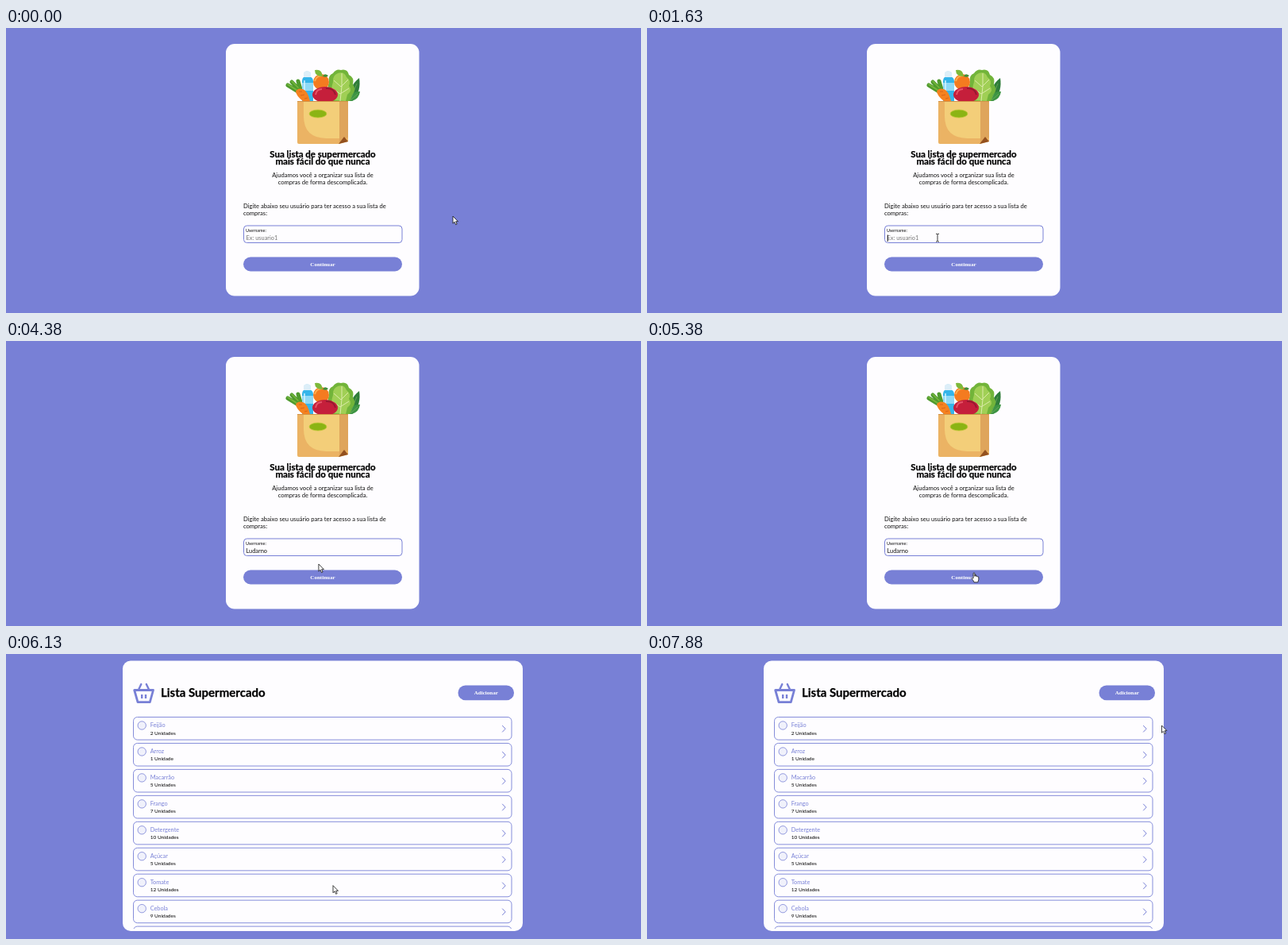
Animation of 800x359 px, one loop 8000 ms. Source, as an HTML page:

```html
<!DOCTYPE html>
<html lang="pt-BR">
<head>
<meta charset="utf-8">
<title>Lista Supermercado</title>
<style>
  html, body { margin: 0; width: 100%; height: 100%; overflow: hidden; background: #7880d6; }
  svg { display: block; width: 100%; height: 100%; }
  text { font-family: Lato, sans-serif; font-size: 7.6px; fill: #111; white-space: pre; }
  .mid { text-anchor: middle; }
  .bold { font-weight: 700; stroke: #000; stroke-width: .25; fill: #000; }
  .button { font: bold 7.05px "Liberation Serif", serif; fill: #fff; text-anchor: middle; }
  .card { fill: #fefdff; }
  .accent { fill: #7880d6; }
  .line { fill: none; stroke: #7880d6; }
  .input { font-size: 7.4px; }
  .name { font-size: 7.3px; fill: #7880d6; }
  .amount { font-size: 6.5px; fill: #000; }
</style>
</head>
<body>
<svg viewBox="0 0 800 359">
  <defs>
    <clipPath id="listArea"><rect x="150" y="78" width="496" height="268"/></clipPath>
  </defs>

  <g id="login">
    <rect class="card" x="277" y="20" width="243.5" height="317.5" rx="11"/>

    <g id="groceries">
      <g stroke="#4f9a2e" stroke-width="5" stroke-linecap="round">
        <path d="M355 72l13 8M360 68l10 10M368 67l3 10"/>
        <path d="M355 71l11 7M360 67l8 8" stroke="#79b83c" stroke-width="1.5"/>
      </g>
      <path d="M432 92Q431 74 445 63Q448 80 436 92Z" fill="#2f7d3a"/>
      <path d="M430 92Q434 79 446 80Q445 89 436 92Z" fill="#3d9444"/>
      <path d="M434 90l8-20M434 91l9-8" stroke="#77b35b" fill="none" stroke-width=".7"/>
      <path d="M409 92Q403 78 407 68Q405 60 412 57Q416 51 422 53Q430 51 432 59Q439 62 437 71Q442 78 436 84L433 92Z" fill="#72b43a"/>
      <path d="M413 91Q408 78 412 68Q411 60 418 57Q426 54 429 62Q435 66 432 73Q437 79 430 84L428 92Z" fill="#a0cf55"/>
      <path d="M421 92Q424 73 423 57M422 74l-9-8M422 74l9-9M421 83l-10-7M421 83l11-7" stroke="#dcebaa" fill="none"/>
      <circle cx="397" cy="68" r="10" fill="#f47b20"/>
      <path d="M389 67Q391 60 398 60" stroke="#ffad4d" stroke-width="2" fill="none"/>
      <path d="M399 61Q389 61 389 53Q398 51 399 61Z" fill="#7db93b"/>
      <path d="M399 61Q401 56 406 60Q404 63 399 61Z" fill="#3f8e38"/>
      <path d="M373 92V67Q373 63 376 61V56Q379 53 383 56V61Q387 63 387 67V92Z" fill="#35b5ea"/>
      <path d="M375 56Q379 52 384 56V62H375Z" fill="#dceef8"/>
      <path d="M373 69h14v10h-14z" fill="#8ed9f6"/>
      <path d="M376 66v24" stroke="#d5f3ff" stroke-width="1.5"/>
      <path d="M365 80Q367 75 374 77Q380 79 383 92H374Q366 86 365 80Z" fill="#f58220"/>
      <path d="M369 80l4 0M371 85l5-1M376 89l4-1" stroke="#d9651a"/>
      <ellipse cx="402" cy="84" rx="16" ry="10" fill="#c51f3b"/>
      <path d="M390 84Q391 77 398 77" stroke="#e55467" stroke-width="2" fill="none"/>
      <path d="M403 76Q413 75 415 84" stroke="#981931" stroke-width="2" fill="none"/>
      <path d="M367 92H431V143L420 146H369Q367 146 367 144Z" fill="#ebb364"/>
      <path d="M375 92H420V139H403Q375 138 375 111Z" fill="#f3ce79"/>
      <path d="M420 92H431V138L425 140L420 146Z" fill="#dfa55b"/>
      <path d="M419 146L426 137L431 143Z" fill="#93501f"/>
      <path d="M367 92.5H431" stroke="#d29449"/>
      <ellipse cx="393" cy="108" rx="11" ry="5" fill="#8bb414" stroke="#c5c93d" stroke-width=".8"/>
    </g>

    <g class="mid">
      <text class="bold" x="399" y="163" style="font-size:11.5px">Sua lista de supermercado</text>
      <text class="bold" x="399" y="172.4" style="font-size:11.5px">mais fácil do que nunca</text>
      <text x="399" y="188.4">Ajudamos você a organizar sua lista de</text>
      <text x="399" y="197.2">compras de forma descomplicada.</text>
    </g>
    <text x="299" y="227.4">Digite abaixo seu usuário para ter acesso a sua lista de</text>
    <text x="299" y="236.2">compras:</text>
    <rect class="line" x="299.5" y="249" width="199.5" height="21.5" rx="4"/>
    <text x="302" y="256.8" style="font-size:5.5px">Username:</text>
    <text id="entry" class="input" x="302.5" y="267.4"></text>
    <path id="caret" d="M0 260.5V269" stroke="#000" stroke-width=".9"/>
    <rect class="accent" x="299" y="288.5" width="200" height="18" rx="9"/>
    <text class="button" x="399" y="299.7">Continuar</text>
  </g>

  <g id="shopping">
    <rect class="card" x="147" y="8.5" width="504" height="340.5" rx="10"/>
    <g class="line" stroke-width="2.8" stroke-linecap="round" stroke-linejoin="round">
      <path d="M161.7 45.5H185.5L181.3 60.7H166Z"/>
      <path d="M170.3 38L167 45M176.8 38L180.2 45" stroke-width="2.4"/>
      <path d="M171.2 51V56M176 51V56" stroke-width="2.4" stroke-linecap="butt"/>
    </g>
    <text class="bold" x="195" y="53.6" style="font-size:15px">Lista Supermercado</text>
    <rect class="accent" x="569.5" y="39.5" width="70.5" height="18.7" rx="9.3"/>
    <text class="button" x="604.8" y="51.3">Adicionar</text>
    <g id="loader">
      <circle id="firstDot" cx="384.6" cy="201.6" r="4.1"/>
      <circle cx="398.7" cy="201.6" r="4.1" fill="#bcc0eb"/>
      <circle cx="412.9" cy="201.6" r="4.1" fill="#bcc0eb"/>
    </g>
    <g id="list" clip-path="url(#listArea)"></g>
  </g>

  <g id="cursor">
    <path id="arrow" d="M0 0V9.2L2.1 7.3L3.6 10.7L5.2 10L3.7 6.7H6.5Z" fill="#fff" stroke="#111" stroke-width=".8"/>
    <path id="beam" d="M-2 -4.8Q0 -4.8 0 -3.8Q0 -4.8 2 -4.8M0 -3.8V4.2M-2 5.2Q0 5.2 0 4.2Q0 5.2 2 5.2" fill="none" stroke="#222" stroke-width=".9"/>
    <path id="hand" d="M-.9 7V.6Q0-.8 .9 .6V4.5Q2-.1 2.7 4.6Q4 3.6 4.4 5.1Q5.8 4.5 5.8 6V8.6Q5.4 10 4.8 12H0Q-.8 9.8-2.8 7.5Q-2.6 6.1-.9 7Z" fill="#fff" stroke="#111" stroke-width=".8"/>
  </g>
</svg>

<script>
const LOOP = 8000, STEP = 125;
const PAGE_CHANGE = 5500, LIST_READY = 6000, FOCUS = 1500;
const USER = 'Ludarno';
const KEY_TIMES = [2375, 2625, 2750, 2875, 3125, 3500, 3750];
// Pointer stops: time, x, y
const STOPS = [
  [0, 563, 237], [1000, 366, 264], [3875, 366, 264], [4750, 412, 292],
  [6750, 412, 291.5], [6875, 415, 279], [7250, 541, 91], [7375, 541, 91],
  [7625, 682, 84], [7875, 648.5, 90]
];
const ITEMS = [
  ['Feijão', 2], ['Arroz', 1], ['Macarrão', 5], ['Frango', 7], ['Detergente', 10],
  ['Açúcar', 5], ['Tomate', 12], ['Cebola', 9], ['Batata', 4]
];

const el = id => document.getElementById(id);
const show = (id, visible) => { el(id).style.display = visible ? '' : 'none'; };
const mix = (a, b, k) => a + (b - a) * k;

el('list').innerHTML = ITEMS.map(([name, count], i) => `
  <g transform="translate(0 ${i * 32.95})">
    <rect class="line" x="160.5" y="79.5" width="476.5" height="28.6" rx="5" stroke-width=".9"/>
    <circle cx="171.2" cy="90" r="5.2" fill="#f0f1fb" stroke="#7880d6" stroke-width=".8"/>
    <text class="name" x="181.7" y="92.2">${name}</text>
    <text class="amount" x="181.7" y="101.5">${count} Unidade${count > 1 ? 's' : ''}</text>
    <path class="line" d="M625.2 90L629.2 94.2L625.2 98.4"/>
  </g>`).join('');

function pointerAt(t) {
  const next = STOPS.findIndex(stop => stop[0] > t);
  if (next < 0) return STOPS.at(-1).slice(1);
  const [t0, x0, y0] = STOPS[next - 1], [t1, x1, y1] = STOPS[next];
  const k = (t - t0) / (t1 - t0), eased = k * k * (3 - 2 * k);
  return [mix(x0, x1, eased), mix(y0, y1, eased)];
}

function drawEntry(t) {
  const typed = KEY_TIMES.filter(time => time <= t);
  const entry = el('entry');
  entry.textContent = typed.length ? USER.slice(0, typed.length) : 'Ex: usuario1';
  entry.style.fill = typed.length ? '#111' : '#757575';
  const caretX = typed.length ? 302.8 + entry.getComputedTextLength() : 303.2;
  el('caret').setAttribute('transform', `translate(${caretX} 0)`);
  const sinceKey = t - (typed.at(-1) ?? FOCUS);
  show('caret', t >= FOCUS && sinceKey % 1000 < 500);
}

function drawPointer(t, loginOpen) {
  const [x, y] = pointerAt(t);
  const over = (top, bottom) => loginOpen && x > 299 && x < 499 && y > top && y < bottom;
  const beam = over(249, 271), hand = over(288, 307);
  show('beam', beam);
  show('hand', hand);
  show('arrow', !beam && !hand);
  el('cursor').setAttribute('transform', `translate(${x} ${y})`);
}

function draw(t) {
  const loginOpen = t < PAGE_CHANGE, loading = t < LIST_READY;
  show('login', loginOpen);
  show('shopping', !loginOpen);
  show('loader', loading);
  show('list', !loading);
  if (loginOpen) drawEntry(t);
  const fade = Math.min(1, Math.max(0, (t - PAGE_CHANGE) / 500));
  const dot = [[120, 188], [128, 192], [214, 235]].map(([a, b]) => mix(a, b, fade));
  el('firstDot').setAttribute('fill', `rgb(${dot})`);
  drawPointer(t, loginOpen);
}

function frame() {
  const t = performance.now() % LOOP;
  draw(Math.floor(t / STEP) * STEP);
  requestAnimationFrame(frame);
}
frame();
</script>
</body>
</html>
```
